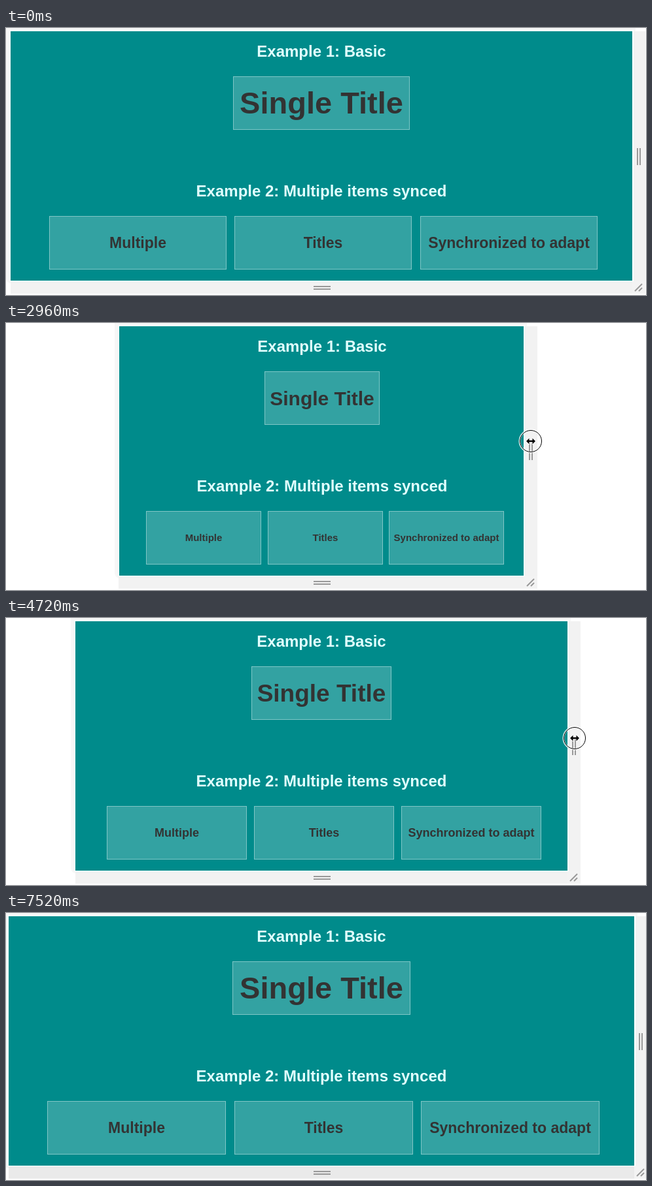
An HTML page for the animation above (7.84 s loop, 978 px wide and 409 px high).

```html
<!DOCTYPE html>
<html lang="en">
<head>
<meta charset="utf-8">
<title>Resizable titles</title>
<style>
  html, body { margin: 0; width: 100%; height: 100%; overflow: hidden; background: #fff; }
  svg { display: block; width: 100%; height: 100%; }
  text { font-family: "Liberation Sans", Arial, sans-serif; font-weight: bold; text-anchor: middle; fill: #333; }
  .head { font-size: 24px; fill: #e0ffff; }
  .box { fill: #33a2a2; stroke: #80c6c6; }
  .grip { fill: none; stroke: #999; stroke-width: 2; }
</style>
</head>
<body>
<svg id="stage" viewBox="0 0 978 409"></svg>
<script>
const LOOP = 7840, STEP = 80, MID = 482;
const BAR_LAG = 18, TEXT_LAG = 72;
const stage = document.getElementById('stage');

function add(tag, attrs = {}, parent = stage, label = '') {
  const el = document.createElementNS('http://www.w3.org/2000/svg', tag);
  set(el, attrs);
  el.textContent = label;
  parent.appendChild(el);
  return el;
}
function set(el, attrs) {
  for (const k in attrs) el.setAttribute(k, attrs[k]);
}

const clamp = u => Math.max(0, Math.min(1, u));
const smooth = u => u * u * (3 - 2 * u);
const mix = (a, b, u) => a + (b - a) * u;

// Drags of the right edge: start, end, width before, width after, cursor lead
const drags = [
  [1460, 1760, 950, 866, 85],
  [2134, 2410, 866, 620, 35],
  [2940, 3210, 620, 496, 0],
  [4320, 4640, 496, 752, 0],
  [5247, 5656, 752, 946, 26],
  [5656, 5920, 946, 956, 0]
];
function widthAt(t, leading) {
  let w = 950;
  for (const [a, b, from, to, lead] of drags) {
    const u = (t + (leading ? lead : 0) - a) / (b - a);
    if (u > 0) w = mix(from, to, smooth(clamp(u)));
  }
  return w;
}

const heights = [[1440, 193], [1520, 186], [1840, 184], [2160, 184], [2480, 181], [2960, 181],
  [3280, 179.5], [4320, 179.5], [4720, 184], [5280, 184], [5520, 189.5]];
function track(keys, t) {
  let [t0, v0] = keys[0];
  for (const [t1, v1] of keys) {
    if (t < t1) return mix(v0, v1, clamp((t - t0) / (t1 - t0)));
    t0 = t1;
    v0 = v1;
  }
  return v0;
}

const gray = v => `rgb(${v},${v},${v})`;
function sideShade(t) {
  if (t < 1040 || t >= 1680) return 242;
  return t < 1120 || t >= 1600 ? 232 : 220;
}

const glow = add('rect', { y: -8, height: 399, rx: 8, fill: '#f7f7f7' });
const side = add('rect', { y: 5, width: 20, height: 382 });
const base = add('rect', { y: 387, height: 20 });
const corner = add('rect', { y: 387, width: 20, height: 20, fill: '#f3f3f3' });
const rim = add('rect', { y: 3, height: 385, fill: '#fff' });
const panel = add('rect', { y: 5, height: 382, fill: '#008b8b' });
const sideGrip = add('path', { class: 'grip', d: 'M-12 184V210M-8 184V210' });
add('path', { class: 'grip', d: 'M470 396H496M470 400H496' });
const cornerGrip = add('path', { class: 'grip', d: 'M-16 403L-5 392M-10 403L-5 398' });

const heads = [['Example 1: Basic', 44], ['Example 2: Multiple items synced', 258]]
  .map(([label, y]) => add('text', { class: 'head', y }, stage, label));

function makeTitle(label, top) {
  const box = add('rect', { class: 'box', y: top + .5, height: 81 });
  const text = add('text', {}, stage, label);
  return (x, w, ratio) => {
    const size = Math.floor(w * ratio);
    set(box, { x: x + .5, width: w - 1 });
    set(text, { x: x + w / 2, y: top + 41 + size * .35, 'font-size': size });
  };
}
const single = makeTitle('Single Title', 74);
const row = ['Multiple', 'Titles', 'Synchronized to adapt'].map(s => makeTitle(s, 288));

const cursor = add('g');
const ring = add('g', { fill: 'none' }, cursor);
add('circle', { r: 17, stroke: '#fff', 'stroke-width': 3, 'stroke-opacity': .8 }, ring);
add('circle', { r: 16.5, stroke: '#000' }, ring);
const outline = { stroke: '#fff', 'stroke-width': 1.5, 'paint-order': 'stroke', 'stroke-linejoin': 'round' };
const resize = add('path', { ...outline, d: 'M-7 0L-2.5 -4.5V-1.2H2.5V-4.5L7 0L2.5 4.5V1.2H-2.5V4.5Z' }, cursor);
const arrow = add('path', { ...outline, d: 'M0 0V15L3.5 11.8L6 17L8.3 16L6 10.8H10.7Z' }, cursor);

function drawCursor(t) {
  const held = t >= 1520 && t < 6880;
  let x, y, pointing = false;
  if (t < 1520) {
    const u = smooth(clamp((t - 80) / 640));
    x = mix(637, 967, u);
    y = mix(397, 193, u);
    pointing = x < 957;
  } else if (held) {
    x = MID + widthAt(t, true) / 2 + 11;
    y = track(heights, t);
  } else {
    const u = clamp((t - 6800) / 640);
    x = mix(971, 830, u * u);
    y = mix(189.5, 425, smooth(u));
    pointing = x < 960 && y < 387;
  }
  set(cursor, {
    transform: `translate(${x.toFixed(1)} ${y.toFixed(1)})`,
    visibility: t >= 80 && t < 7520 ? 'visible' : 'hidden'
  });
  set(ring, { display: held ? 'inline' : 'none' });
  set(arrow, { display: pointing ? 'inline' : 'none' });
  set(resize, { display: pointing ? 'none' : 'inline' });
}

function draw(t) {
  const w = widthAt(t), bars = widthAt(t - BAR_LAG), inner = widthAt(t - TEXT_LAG);
  const left = Math.round(MID - w / 2), right = Math.round(MID + w / 2);
  const barLeft = Math.round(MID - bars / 2), barRight = Math.round(MID + bars / 2);

  set(glow, { x: left - 7, width: right - left + 12 });
  set(rim, { x: left - 1, width: right - left + 3 });
  set(panel, { x: left, width: right - left });
  set(side, { x: barRight, fill: gray(sideShade(t)) });
  set(base, { x: barLeft, width: barRight - barLeft, fill: gray(t < 7200 ? 242 : 234) });
  set(corner, { x: barRight });
  for (const g of [sideGrip, cornerGrip]) set(g, { transform: `translate(${barRight + 20} 0)` });

  const mid = Math.round(left + inner / 2);
  heads.forEach(h => set(h, { x: mid }));
  const one = Math.round(inner * .287 - 2.3);
  single(Math.round(mid - one / 2), one, .175);
  const each = Math.round(inner * .289 - 3.3);
  row.forEach((place, i) => {
    const x = inner * .055 + 6.7 + i * (inner * .2963 + 2);
    place(left + Math.round(x), each, .087);
  });
  drawCursor(t);
}

const start = performance.now();
function tick() {
  const t = (performance.now() - start) % LOOP;
  draw(Math.floor(t / STEP) * STEP);
  requestAnimationFrame(tick);
}
tick();
</script>
</body>
</html>
```
